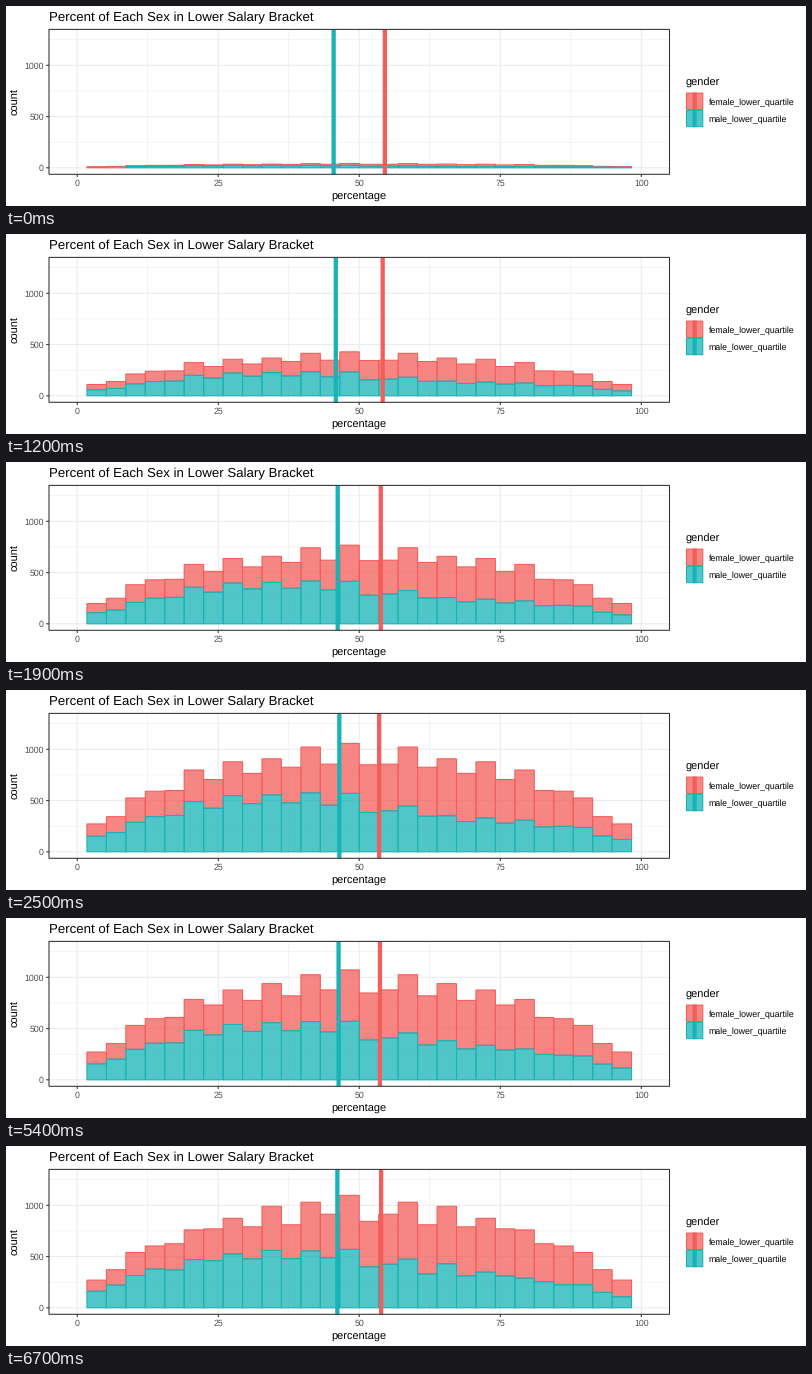
A matplotlib script that plays this animation: 800 by 200 pixels, repeating every 8000 ms.

```python
import numpy as np
import matplotlib.pyplot as plt
from matplotlib.animation import FuncAnimation
from matplotlib.patches import Rectangle

plt.rcParams.update({
    "font.family": "Liberation Sans",
    "text.hinting": "none",
    "path.snap": False,
    "toolbar": "None",
})

W, H, DPI = 800, 200, 72
FRAMES, INTERVAL = 80, 100
STEPS = 21
RED, TEAL = "#F35E5A", "#17B3B7"
INK, TICK, GRID = "#333333", "#4D4D4D", "#EBEBEB"
LEFT, RIGHT, TOP, BOTTOM = 43.0, 663.5, 23.4, 168.3
ALPHA = 0.75
THIN, THICK = 1.07, 4.27


def px(v):
    return LEFT + (v + 5) * (RIGHT - LEFT) / 110


def py(count):
    return 161.8 - 0.1025 * count


def mirror(male, at_half):
    """Female counts: the male bins reversed, with exact halves kept left."""
    female = male[::-1].copy()
    female[13] += at_half
    female[14] -= at_half
    return female


male_mid = np.array([
    152, 188, 287, 343, 355, 490, 425, 548, 470, 555, 478, 575, 455, 570,
    383, 400, 447, 347, 352, 295, 330, 280, 308, 243, 248, 238, 155, 120.0])
male_end = np.array([
    162, 222, 315, 378, 370, 470, 460, 525, 478, 560, 480, 555, 488, 570,
    400, 425, 475, 330, 430, 312, 348, 310, 290, 255, 225, 225, 150, 108.0])
female_mid = mirror(male_mid, 104)
female_end = mirror(male_end, 127)

male_start = 0.042 * male_mid
male_start[:2] = 0
female_start = 0.04 * (male_mid + female_mid) - male_start

MALE = (male_start, male_mid, male_end)
FEMALE = (female_start, female_mid, female_end)
MEAN = (45.46, 46.47, 46.12)

fig = plt.figure(figsize=(W / DPI, H / DPI), dpi=DPI, facecolor="white")
ax = fig.add_axes([0, 0, 1, 1])
ax.set_xlim(0, W)
ax.set_ylim(H, 0)
ax.axis("off")


def line(x0, y0, x1, y1, color, width, z):
    return ax.plot([x0, x1], [y0, y1], color=color, lw=width, zorder=z,
                   solid_capstyle="butt")[0]


def box(x, y, w, h, color, z):
    rect = Rectangle((x, y), w, h, fc=(color, ALPHA), ec=color, lw=THIN,
                     joinstyle="miter", zorder=z)
    return ax.add_patch(rect)


def text(x, y, s, size, color="black", ha="left", **kw):
    kw.setdefault("va", "baseline")
    ax.text(x, y, s, fontsize=size, color=color, ha=ha, zorder=6, **kw)


# Grid, ticks and tick labels
for v in (12.5, 37.5, 62.5, 87.5):
    line(px(v), TOP, px(v), BOTTOM, GRID, THIN / 2, 0)
for v in (250, 750, 1250):
    line(LEFT, py(v), RIGHT, py(v), GRID, THIN / 2, 0)
for v in (0, 25, 50, 75, 100):
    line(px(v), TOP, px(v), BOTTOM, GRID, THIN, 1)
    line(px(v), BOTTOM, px(v), BOTTOM + 2.75, INK, THIN, 5)
    text(px(v), 179.8, str(v), 8.8, TICK, "center")
for v in (0, 500, 1000):
    line(LEFT, py(v), RIGHT, py(v), GRID, THIN, 1)
    line(LEFT - 2.75, py(v), LEFT, py(v), INK, THIN, 5)
    text(38, py(v) + 3.2, str(v), 8.8, TICK, "right")
ax.add_patch(Rectangle((LEFT, TOP), RIGHT - LEFT, BOTTOM - TOP, fill=False,
                       ec=INK, lw=THIN, joinstyle="miter", zorder=5))

# Titles
text(LEFT, 15, "Percent of Each Sex in Lower Salary Bracket", 13.2)
text((LEFT + RIGHT) / 2, 192.6, "percentage", 11, ha="center")
text(13.4, (TOP + BOTTOM) / 2, "count", 11, ha="right", va="center",
     rotation=90, rotation_mode="default")

# Legend
KEY = 17.28
text(680, 80, "gender", 11)
for i, (name, color) in enumerate((("female", RED), ("male", TEAL))):
    top = 86.6 + i * KEY
    box(680.5, top + 0.5, KEY - 1, KEY - 1, color, 2)
    line(680 + KEY / 2, top, 680 + KEY / 2, top + KEY, color, THICK, 3)
    text(702.6, top + KEY / 2 + 3.6, name + "_lower_quartile", 8.8)

# Moving parts
BIN = 100 / 29
edges = px((np.arange(28) + 0.5) * BIN)
bar_w = px(BIN) - px(0)
female_bars = [box(x, py(0), bar_w, 0, RED, 2) for x in edges]
male_bars = [box(x, py(0), bar_w, 0, TEAL, 3) for x in edges]
female_mean = line(0, TOP, 0, BOTTOM, RED, THICK, 4)
male_mean = line(0, TOP, 0, BOTTOM, TEAL, THICK, 4)


def blend(states, p, q):
    a, b, c = states
    return a + (b - a) * p + (c - b) * q


def set_bar(bar, low, count):
    bar.set_y(py(low))
    bar.set_height(py(low + count) - py(low))
    bar.set_visible(count > 0.5)


def update(n):
    p = min(max((n - 4) / STEPS, 0), 1)
    q = min(max((n - 46) / STEPS, 0), 1)
    males, females = blend(MALE, p, q), blend(FEMALE, p, q)
    for mb, fb, m, f in zip(male_bars, female_bars, males, females):
        set_bar(mb, 0, m)
        set_bar(fb, m, f)
    mean = blend(MEAN, p, q)
    male_mean.set_xdata([px(mean)] * 2)
    female_mean.set_xdata([px(100 - mean)] * 2)
    return [*male_bars, *female_bars, male_mean, female_mean]


anim = FuncAnimation(fig, update, frames=FRAMES, interval=INTERVAL,
                     init_func=lambda: update(0), repeat=True,
                     repeat_delay=0, blit=False)
plt.show()
```
